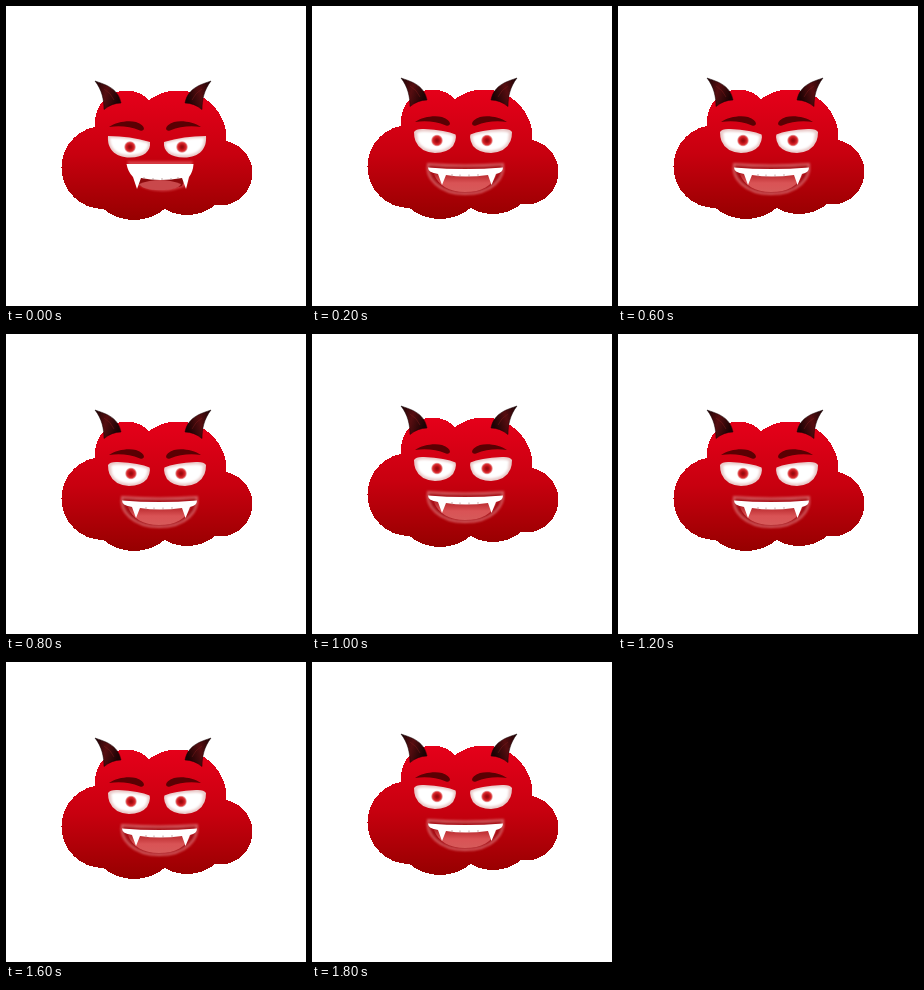
Animation of 300x300 px, one loop 2 s. Source, as an HTML page:

```html
<!DOCTYPE html>
<html lang="en">
<head>
<meta charset="utf-8">
<title>Devil cloud</title>
<style>
  html, body { margin: 0; width: 100%; height: 100%; overflow: hidden; background: #fff; }
  svg { display: block; width: 100vw; height: 100vh; }
  .bob { animation: bob 2s step-end infinite; }
  .scowl { animation: scowl 2s step-end infinite; }
  .grin { animation: grin 2s step-end infinite; }
  .cloud { --up: -1px; --low: 3px; }
  .horns { --up: -3px; --low: 1px; }
  .face { --up: -5px; --low: 0px; }
  @keyframes bob {
    0% { transform: translateY(0); }
    10%, 30%, 50%, 70%, 90% { transform: translateY(var(--up)); }
    20%, 40%, 60%, 80% { transform: translateY(var(--low)); }
  }
  @keyframes scowl { 0% { visibility: visible; } 10%, 100% { visibility: hidden; } }
  @keyframes grin { 0% { visibility: hidden; } 10%, 100% { visibility: visible; } }
</style>
</head>
<body>
<svg viewBox="0 0 300 300">
  <defs>
    <linearGradient id="red" gradientUnits="userSpaceOnUse" x1="0" y1="83" x2="0" y2="214">
      <stop offset="0" stop-color="#e6001a"/>
      <stop offset=".5" stop-color="#c8000f"/>
      <stop offset="1" stop-color="#960000"/>
    </linearGradient>
    <linearGradient id="hornFill" x1="0" y1="0" x2="1" y2=".35">
      <stop offset="0" stop-color="#1c0305"/>
      <stop offset=".5" stop-color="#560d10"/>
      <stop offset="1" stop-color="#1c0304"/>
    </linearGradient>
    <linearGradient id="tongue" x1="0" y1="0" x2="0" y2="1">
      <stop offset="0" stop-color="#b8282c"/>
      <stop offset=".5" stop-color="#d95355"/>
      <stop offset="1" stop-color="#d65a5a"/>
    </linearGradient>
    <radialGradient id="iris">
      <stop offset="0" stop-color="#8c0a0e"/>
      <stop offset=".3" stop-color="#b00c12"/>
      <stop offset=".65" stop-color="#dc2a2e"/>
      <stop offset=".8" stop-color="#e48a8a"/>
      <stop offset="1" stop-color="#fff" stop-opacity="0"/>
    </radialGradient>
    <filter id="soft" x="-20%" y="-30%" width="140%" height="160%"><feGaussianBlur stdDeviation="1"/></filter>
    <filter id="crisp" x="-20%" y="-30%" width="140%" height="160%"><feGaussianBlur stdDeviation=".4"/></filter>

    <g id="horn">
      <path d="M89 75C97 78 112 81 115 97Q106 97 98 103.500C98 94 96 84 89 75Z" fill="url(#hornFill)" stroke="#140204" stroke-width=".5"/>
      <path d="M98 83Q105 87 108 94" fill="none" stroke="#7a1c1d" stroke-width=".8" opacity=".6"/>
    </g>
    <path id="brow" d="M103 121C110 116 122 114 130 116Q138 119 138 123Q137 125.500 134 124.500C124 120.500 114 119.500 103 121Z" fill="#5a0003" filter="url(#crisp)"/>
    <g id="openEye">
      <path d="M102 131Q104 127.500 112 128Q134 129 143.500 133.500Q145 138 141 145Q135 152 123 152Q108 151 103.500 140Q102 136 102 131Z" fill="#e9c9c8" filter="url(#crisp)"/>
      <path d="M105 132Q107 130 113 130.500Q133 131 141.500 135Q142 139 139 144Q133 149.500 123 149.500Q110 148.500 106 140Z" fill="#fff" filter="url(#soft)"/>
    </g>
    <g id="slitEye">
      <path d="M102 130Q124 130 144 136C145 145 138 151.500 124 151.500C108 151.500 101 142 102 130Z" fill="#e9c9c8" filter="url(#crisp)"/>
      <path d="M104 132Q124 132 142 137C143 144 136 149 124 149C110 149 104 142 104 132Z" fill="#fff" filter="url(#soft)"/>
    </g>
    <circle id="pupil" r="6.500" fill="url(#iris)"/>
  </defs>

  <g class="bob cloud" fill="url(#red)" shape-rendering="crispEdges">
    <circle cx="120.500" cy="116" r="31.500"/>
    <circle cx="172" cy="133" r="48.500"/>
    <circle cx="97" cy="161.500" r="41.500"/>
    <circle cx="214" cy="167" r="32.500"/>
    <ellipse cx="128" cy="175" rx="44" ry="39"/>
    <ellipse cx="181" cy="171" rx="42" ry="38"/>
  </g>

  <g class="bob horns">
    <use href="#horn"/>
    <use href="#horn" transform="matrix(-1 0 0 1 294 0)"/>
  </g>

  <g class="bob face">
    <use href="#brow"/>
    <use href="#brow" transform="matrix(-1 0 0 1 298 0)"/>
  </g>

  <g class="scowl">
    <use href="#slitEye"/>
    <use href="#slitEye" transform="matrix(-1 0 0 1 302 0)"/>
    <use href="#pupil" x="124" y="141"/>
    <use href="#pupil" x="176" y="141"/>
    <path d="M121 155H187L180 180Q154 191 132 179Z" fill="#e05a5e" opacity=".65" filter="url(#soft)"/>
    <path d="M130 170H180L176 180Q154 187 134 180Z" fill="#8c080c"/>
    <path d="M133 178Q154 170 175 178Q172 184 154 184Q137 184 133 178Z" fill="#c9484b" filter="url(#crisp)"/>
    <path d="M120.500 158H187.500Q187 166 183 171L180 183L176 172Q154 176 135 172L131 183L127 171Q122 166 120.500 158Z" fill="#fff" filter="url(#crisp)"/>
    <path d="M138 173V171M147 174V172M156 174V172M165 174V172M172 173V171" stroke="#a88" stroke-width=".7"/>
  </g>

  <g class="grin">
    <g class="bob face">
      <use href="#openEye"/>
      <use href="#openEye" transform="matrix(-1 0 0 1 302 0)"/>
      <use href="#pupil" x="125" y="139.500"/>
      <use href="#pupil" x="175" y="139.500"/>
      <path d="M116 163Q153 166 191 163C193 177 181 193 153 193C127 193 113 177 116 163Z" fill="#a80c13" stroke="#df6f72" stroke-width="2" stroke-opacity=".8" filter="url(#soft)"/>
      <path d="M122 173H185C180 185 170 191 153 191C137 191 126 184 122 173Z" fill="url(#tongue)" filter="url(#crisp)"/>
      <path d="M116 166.500Q153 169.500 191 166.500Q191 171.500 184 173L179.500 184L176 174Q153 177 134 174L130 184L126 173Q116 171.500 116 166.500Z" fill="#fff" filter="url(#crisp)"/>
      <path d="M140 175.500V173M148 176V173.500M157 176V173.500M166 175.500V173" stroke="#b88" stroke-width=".7"/>
    </g>
  </g>
</svg>
</body>
</html>
```
